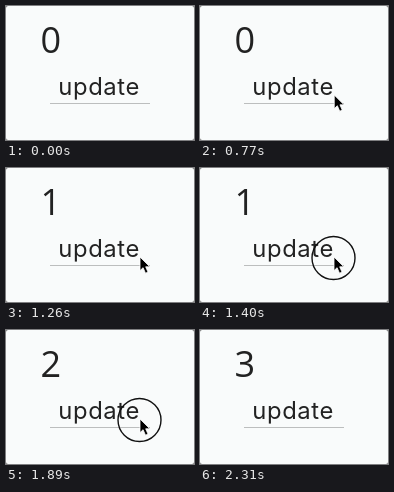
Write an HTML page that moves like this. It is 188 px wide and 134 px high and loops after 2450 ms.

```html
<!DOCTYPE html>
<html lang="en">
<head>
<meta charset="utf-8">
<title>Update counter</title>
<style>
  html, body { margin: 0; width: 100%; height: 100%; overflow: hidden; background: #777; }
  svg { display: block; width: 100vw; height: 100vh; }
  text { fill: #222; }
  #count { font: 36px "Open Sans", "Noto Sans", sans-serif; }
  #label { font: 23.8px Inter, "Liberation Sans", sans-serif; letter-spacing: .65px; }
</style>
</head>
<body>
<svg viewBox="0 0 188 134">
  <defs>
    <linearGradient id="green" x2="0" y2="1">
      <stop offset="0" stop-color="#7dbb55"/>
      <stop offset="1" stop-color="#559733"/>
    </linearGradient>
  </defs>
  <rect width="188" height="134" rx="2.5" fill="#f9fbfb"/>
  <text id="count" x="34.4" y="47">0</text>
  <rect id="line" x="44" y="97" width="100" height="1" fill="#bcbebe"/>
  <rect id="button" x="36.5" y="60.5" width="115" height="36.5" rx="5" fill="url(#green)" stroke="#4f8f30"/>
  <text id="label" x="52.2" y="89">update</text>
  <circle id="ring" cx="133.5" cy="90" r="21.5" fill="none" stroke="#111" stroke-width="1.4"/>
  <path id="cursor" d="M0 0V13.6L3.1 10.7L5.5 16.2L8 15.1L5.7 9.8H9.8Z" fill="#000" stroke="#fff" stroke-width=".8"/>
</svg>
<script>
  const LOOP = 2450, STEP = 70;
  const CLICKS = [840, 1400, 1890]; // ring, then press, then next number
  const ENTER = 490, LEAVE = 2100, GONE = 2310;
  const $ = id => document.getElementById(id);
  const show = (id, on) => $(id).setAttribute("visibility", on ? "visible" : "hidden");
  const clamp = v => Math.max(0, Math.min(1, v));

  function draw(now) {
    const t = Math.floor(now % LOOP / STEP) * STEP;
    $("count").textContent = CLICKS.filter(c => t >= c + 2 * STEP).length;

    const pressed = CLICKS.includes(t - STEP);
    show("button", pressed);
    show("line", !pressed);
    $("label").style.fill = pressed ? "#1f3314" : "";
    show("ring", CLICKS.includes(t));

    const enter = 1 - (1 - clamp((t - ENTER) / 350)) ** 2;
    const leave = clamp((t - LEAVE + STEP) / (GONE - LEAVE + STEP)) ** 2;
    const x = 140 - 6 * enter + 14 * leave;
    const y = 89.5 - .5 * enter + 50 * leave;
    $("cursor").setAttribute("transform", `translate(${x} ${y})`);
    show("cursor", t >= ENTER && t < GONE);
  }

  const start = performance.now();
  function tick() {
    draw(performance.now() - start);
    requestAnimationFrame(tick);
  }
  tick();
</script>
</body>
</html>
```
